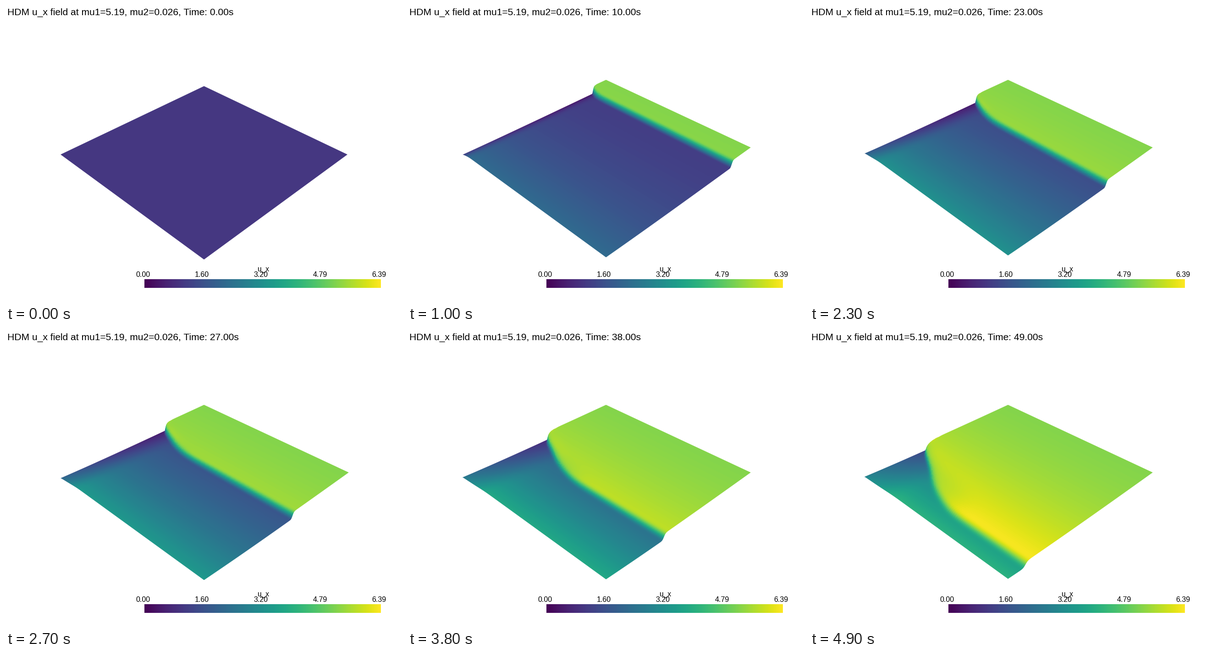
Recreate the animation shown at these times as a matplotlib script. Size 864 by 648 pixels, loop 5000 ms.

```python
import numpy as np
import matplotlib.pyplot as plt
from matplotlib.animation import FuncAnimation
from matplotlib.patches import PathPatch
from matplotlib.path import Path

W, H = 864, 648
FRAMES, INTERVAL = 50, 100
MU1, MU2 = 5.19, 0.026
U_MAX = 6.391

# Domain [0, 100]^2, cell-centred grid
N, SIDE = 250, 100.0
CELL = SIDE / N
CENTERS = (np.arange(N) + 0.5) * CELL
FRAME_TIME, SUBSTEPS = 0.5, 20
SOURCE = 0.02 * np.exp(MU2 * CENTERS)[:, None]


def rates(u, v):
    """Upwind time derivatives of the 2D inviscid Burgers equations."""
    uv = u * v
    du = np.diff(u * u, axis=0, prepend=MU1 ** 2) + np.diff(uv, axis=1, prepend=0.0)
    dv = np.diff(uv, axis=0, prepend=0.0) + np.diff(v * v, axis=1, prepend=0.0)
    return SOURCE - du * (0.5 / CELL), dv * (-0.5 / CELL)


def solve():
    u, v = np.ones((N, N)), np.ones((N, N))
    dt = FRAME_TIME / SUBSTEPS
    fields = [u]
    for _ in range(FRAMES - 1):
        for _ in range(SUBSTEPS):
            du1, dv1 = rates(u, v)
            du2, dv2 = rates(u + dt * du1, v + dt * dv1)
            u = u + 0.5 * dt * (du1 + du2)
            v = v + 0.5 * dt * (dv1 + dv2)
        fields.append(u)
    return fields


# Isometric perspective camera, 30 degree view angle, fitted to the flat sheet
HALF_ANGLE = np.radians(15)
DISTANCE = (SIDE - CELL) / np.sqrt(2) / np.sin(HALF_ANGLE)
FOCAL = H / 2 / np.tan(HALF_ANGLE)


def project(x, y, z):
    x, y, z = x - SIDE / 2, y - SIDE / 2, z - 1
    scale = FOCAL / (DISTANCE - (x + y + z) / np.sqrt(3))
    px = W / 2 + scale * (y - x) / np.sqrt(2)
    py = H / 2 - scale * (2 * z - x - y) / np.sqrt(6)
    return px, py


# The mesh reaches past the sheet; a white mask trims it to a smooth outline
PAD = 2
PADDED = (np.arange(-PAD, N + PAD) + 0.5) * CELL
GX, GY = np.meshgrid(PADDED, PADDED, indexing="ij")
STAGE = Path([(0, 0), (W, 0), (W, H), (0, H), (0, 0)], closed=True)

# Fine lines along x for the steep front, sparse ones where y hardly matters
Y_LINES = np.r_[0:130, 130:N + 2 * PAD:3]


def refine(a):
    a = a[:, Y_LINES]
    out = np.repeat(a, 2, axis=0)[:-1]
    out[1::2] = (a[:-1] + a[1:]) / 2
    return out


def skyline(px, py):
    """Upper envelope of the sheet above its back left edge."""
    columns = px[:, 0]
    heights = [np.interp(columns, px[::-1, j], py[::-1, j], left=H, right=H)
               for j in range(N)]
    return np.min(heights, axis=0)


def outline(px, py):
    inner = slice(PAD, PAD + N)
    px, py = px[inner, inner], py[inner, inner].copy()
    py[:, 0] = skyline(px, py)

    def ring(a):
        return np.concatenate([a[:, 0], a[-1, 1:], a[-2::-1, -1], a[0, -2::-1]])

    return Path(np.column_stack([ring(px), ring(py)]), closed=True)


plt.rcParams["font.family"] = "Liberation Sans"
fig = plt.figure(figsize=(W / 72, H / 72), dpi=72, facecolor="white")
ax = fig.add_axes([0, 0, 1, 1])

ax.imshow(np.linspace(0, 1, 256)[None, :], cmap="viridis", aspect="auto",
          interpolation="nearest", extent=(302, 817.5, 615, 596), zorder=4)
ax.set_xlim(0, W)
ax.set_ylim(H, 0)
ax.axis("off")

mask = PathPatch(STAGE, facecolor="white", edgecolor="none", linewidth=0, zorder=3)
ax.add_patch(mask)


def label(x, y, text, size, ha="center"):
    return ax.text(x, y, text, fontsize=size, ha=ha, va="baseline",
                   color="black", zorder=5)


title = label(2.6, 19.5, "", 21, ha="left")
label(561.5, 579, "u_x", 15.5)
for i in range(5):
    label(299 + 128.6 * i, 591, f"{U_MAX * i / 4:.2f}", 16)

fields = solve()


def update(frame):
    for old in list(ax.collections):
        old.remove()
    z = np.pad(fields[frame], PAD, mode="edge")
    px, py = project(GX, GY, z)
    u = refine(z)
    shade = (u[:-1, :-1] + u[1:, :-1] + u[:-1, 1:] + u[1:, 1:]) / 4
    # Half a pixel offset balances the painting order of the cells
    mesh = ax.pcolormesh(refine(px) + 0.5, refine(py) - 0.5, shade,
                         cmap="viridis", vmin=0, vmax=U_MAX, snap=False, zorder=2)
    mask.set_path(Path.make_compound_path(STAGE, outline(px, py)))
    title.set_text(f"HDM u_x field at mu1={MU1:.2f}, mu2={MU2:.3f}, "
                   f"Time: {frame:.2f}s")
    return [mesh, mask, title]


anim = FuncAnimation(fig, update, frames=FRAMES, interval=INTERVAL,
                     repeat=True, repeat_delay=0, blit=False)
plt.show()
```
